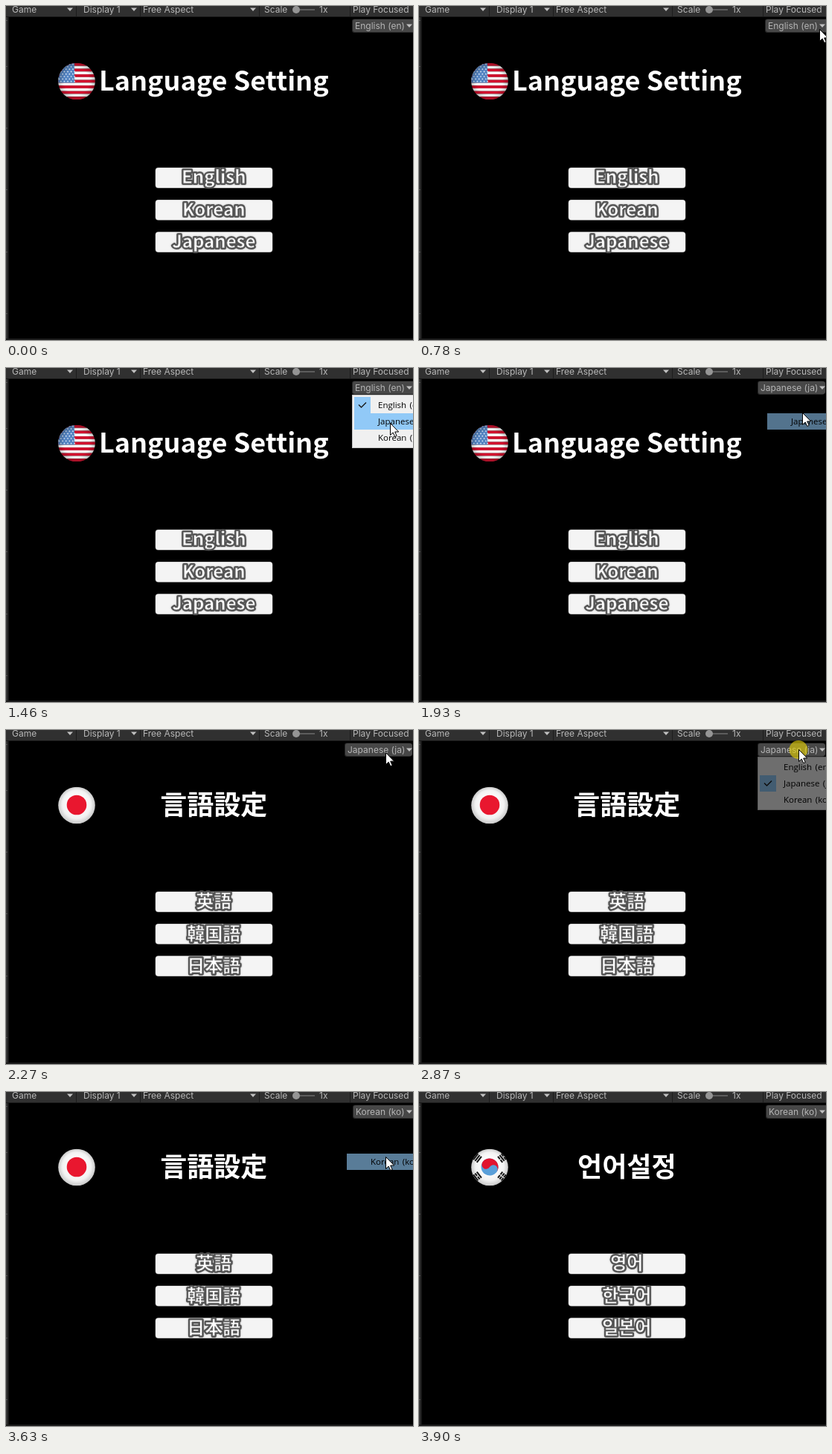
Animation of 547 by 450 pixels, one loop 4.72 s. Source, as an HTML page with a canvas:

```html
<!DOCTYPE html>
<html lang="en">
<head>
<meta charset="utf-8">
<style>
  html, body { margin: 0; width: 100%; height: 100%; overflow: hidden; background: #000; }
  canvas { display: block; }
</style>
</head>
<body>
<canvas id="stage" width="547" height="450"></canvas>
<script>
const c = document.getElementById('stage').getContext('2d');
const LOOP = 4720;
const UI = '12px Inter, Roboto, sans-serif';
const MENU = '11.5px "Open Sans", "Noto Sans", sans-serif';
const BLUE = '#91c9f7';
const FLAG = { x: 95, y: 101.5, r: 24.8 };

const LANGS = {
  en: { label: 'English (en)', x: 465, cjk: 'KR', title: 'Language Setting',
        buttons: ['English', 'Korean', 'Japanese'], flag: flagUS },
  ja: { label: 'Japanese (ja)', x: 455, cjk: 'JP', title: '言語設定',
        buttons: ['英語', '韓国語', '日本語'], flag: flagJapan },
  ko: { label: 'Korean (ko)', x: 466, cjk: 'KR', title: '언어설정',
        buttons: ['영어', '한국어', '일본어'], flag: flagKorea }
};
const ITEMS = ['en', 'ja', 'ko'];

// Each pick: open the menu, then choose a row.
const PICKS = [
  { open: 1050, choose: 1720, from: 'en', to: 'ja' },
  { open: 2870, choose: 3430, from: 'ja', to: 'ko' }
];
// Pointer path: time, x, y
const PATH = [
  [780, 538, 31], [1020, 529, 22], [1185, 529, 22], [1250, 527, 31], [1460, 516, 74],
  [1840, 516, 74], [1930, 515, 60], [2200, 510, 31], [2610, 510, 26], [2950, 510, 26],
  [3160, 510, 87], [3650, 510, 87], [3900, 547, 80]
];

const clamp = v => Math.max(0, Math.min(1, v));

function rect(x, y, w, h, color) {
  c.fillStyle = color;
  c.fillRect(x, y, w, h);
}

function disc(x, y, r, color) {
  c.fillStyle = color;
  c.beginPath();
  c.arc(x, y, r, 0, Math.PI * 2);
  c.fill();
}

function box(x, y, w, h, r, color) {
  c.fillStyle = color;
  c.beginPath();
  c.roundRect(x, y, w, h, r);
  c.fill();
}

function text(s, x, y, font, color, align = 'left') {
  c.font = font;
  c.fillStyle = color;
  c.textAlign = align;
  c.fillText(s, x, y);
}

function arrowDown(x, y) {
  c.fillStyle = '#c0c0c0';
  c.beginPath();
  c.moveTo(x - 4, y);
  c.lineTo(x + 4, y);
  c.lineTo(x, y + 4.5);
  c.fill();
}

function pointerAt(t) {
  const i = PATH.findIndex(p => p[0] > t);
  const [t0, x0, y0] = PATH[i - 1], [t1, x1, y1] = PATH[i];
  const k = (t - t0) / (t1 - t0);
  return [x0 + (x1 - x0) * k, y0 + (y1 - y0) * k];
}

// Flags are drawn around the origin and clipped to a circle.
function flagUS() {
  const stripe = 49 / 13;
  for (let i = 0; i < 13; i++) rect(-25, -24.5 + i * stripe, 50, stripe, i % 2 ? '#fff' : '#d3122f');
  rect(-25, -25, 22, 0.5 + stripe * 7, '#5585c2');
  for (let row = 0; row < 8; row++)
    for (let col = 0; col < 5; col++)
      disc(-23.5 + col * 4.6 + (row % 2) * 2.3, -23 + row * 3.3, 0.85, '#e4eefa');
  const shade = c.createRadialGradient(0, 0, 17, 0, 0, 25);
  shade.addColorStop(0, 'rgba(0,0,0,0)');
  shade.addColorStop(1, 'rgba(0,0,0,.25)');
  rect(-25, -25, 50, 50, shade);
}

function ball() {
  const g = c.createRadialGradient(0, -4, 8, 0, 0, 25);
  g.addColorStop(0, '#fff');
  g.addColorStop(0.65, '#f2f2f2');
  g.addColorStop(1, '#c8c8c8');
  rect(-25, -25, 50, 50, g);
}

function flagJapan() {
  ball();
  disc(0, -0.5, 13.3, '#e9172f');
}

function trigram(x, y, angle, bars) {
  c.save();
  c.translate(x, y);
  c.rotate(angle);
  bars.forEach((solid, i) => {
    rect(-5, i * 3 - 4, 10, 2, '#111');
    if (!solid) rect(-0.7, i * 3 - 4, 1.4, 2, '#eee');
  });
  c.restore();
}

function flagKorea() {
  ball();
  c.save();
  c.translate(0, -0.5);
  c.rotate(0.55);
  disc(0, 0, 11.5, '#5a9fd9');
  c.fillStyle = '#e2132f';
  c.beginPath();
  c.arc(0, 0, 11.5, Math.PI, 0);
  c.fill();
  disc(-5.75, 0, 5.75, '#e2132f');
  disc(5.75, 0, 5.75, '#5a9fd9');
  c.restore();
  trigram(-16.5, -12.5, -0.9, [1, 1, 1]);
  trigram(16.5, -12.5, 0.9, [0, 1, 0]);
  trigram(-16.5, 12, 0.9, [1, 0, 1]);
  trigram(16.5, 12, -0.9, [0, 0, 0]);
}

function drawFlag(flag) {
  c.save();
  c.translate(FLAG.x, FLAG.y);
  c.beginPath();
  c.arc(0, 0, FLAG.r, 0, Math.PI * 2);
  c.clip();
  flag();
  c.restore();
}

function drawEditor() {
  rect(0, 0, 547, 450, '#000');
  rect(0, 14, 4, 436, '#191919');
  rect(0, 14, 2, 436, '#353535');
  for (const y of [19, 81, 164, 247, 331, 414]) rect(0, y, 2, 1, '#5a5a5a');
  rect(0, 448, 547, 2, '#1c1c1c');
  rect(0, 0, 547, 14, '#303030');
  rect(0, 14, 547, 1, '#191919');
  for (const x of [94, 180, 340, 462]) rect(x, 0, 1, 14, '#1c1c1c');
  const labels = [['Game', 8], ['Display 1', 104], ['Free Aspect', 184], ['Scale', 347], ['1x', 421], ['Play Focused', 466]];
  for (const [s, x] of labels) text(s, x, 9, UI, '#b8b8b8');
  for (const x of [86, 172, 332]) arrowDown(x, 2.5);
  rect(390, 4, 25, 2, '#5c5c5c');
  disc(390, 5, 5, '#959595');
}

// White letters whose soft gray outline also eats into the face.
function outlinedText(s, x, y, font) {
  c.font = font;
  c.textAlign = 'center';
  c.lineJoin = 'round';
  c.lineWidth = 4;
  c.strokeStyle = '#505050';
  c.shadowColor = 'rgba(60,60,60,.5)';
  c.shadowBlur = 2;
  c.strokeText(s, x, y);
  c.shadowBlur = 0;
  text(s, x, y, font, '#fff', 'center');
  c.lineWidth = 0.8;
  c.strokeStyle = '#6a6a6a';
  c.strokeText(s, x, y);
}

function drawScene(lang) {
  drawFlag(lang.flag);
  const family = `"Noto Sans CJK ${lang.cjk}", "Noto Sans CJK", "Noto Sans", sans-serif`;
  text(lang.title, 279.3, 114, `bold 36px ${family}`, '#fff', 'center');
  lang.buttons.forEach((s, i) => {
    const y = 218 + i * 43.3;
    box(200.6, y - 0.4, 157.8, 27.8, 4, '#777');
    box(201, y, 157, 27, 4, '#f4f4f4');
    outlinedText(s, 279.3, y + 21.3, `bold 24px ${family}`);
  });
}

function drawDropdown(lang) {
  box(lang.x, 17.5, 90, 18.5, 3, '#262626');
  box(lang.x + 1, 18, 90, 17, 3, '#474747');
  text(lang.label, lang.x + 4, 31, UI, '#b4b4b4');
  arrowDown(542, 24.5);
}

function drawRowText(x, i) {
  c.wordSpacing = '1.5px';
  text(LANGS[ITEMS[i]].label, x + 35, 54 + i * 22, MENU, '#000');
  c.wordSpacing = '0px';
}

function drawMenu(x, checked, hover) {
  rect(x, 36, 100, 72, '#c4c4c4');
  rect(x + 1, 37, 100, 70, '#f0f0f0');
  if (hover >= 0) rect(x + 3, 39 + hover * 22, 100, 22, BLUE);
  const y = 39 + checked * 22;
  rect(x + 3, y, 22, 22, BLUE);
  c.strokeStyle = '#1a1a1a';
  c.lineWidth = 1.4;
  c.beginPath();
  c.moveTo(x + 9, y + 10.5);
  c.lineTo(x + 12.5, y + 14);
  c.lineTo(x + 19, y + 7.5);
  c.stroke();
  ITEMS.forEach((_, i) => drawRowText(x, i));
}

// Fades an area as a whole against the black view.
function veil(x, y, w, h, opacity) {
  rect(x, y, w, h, `rgba(0,0,0,${1 - clamp(opacity)})`);
}

function drawPick(t, pick, pointerY) {
  const x = LANGS[pick.from].x, since = t - pick.choose;
  if (t >= pick.open && since < 70) {
    drawMenu(x, ITEMS.indexOf(pick.from), Math.floor((pointerY - 39) / 22));
    veil(x, 36, 100, 72, 0.45 + (t - pick.open) / 130);
  } else if (since >= 70 && since < 330) {
    // The chosen row lingers after the menu closes.
    const row = ITEMS.indexOf(pick.to), y = 39 + row * 22;
    rect(x + 3, y, 100, 22, BLUE);
    drawRowText(x, row);
    veil(x + 3, y, 100, 22, 1 - (since - 120) / 210);
  }
}

function drawPointer(x, y) {
  c.save();
  c.translate(x, y);
  c.beginPath();
  for (const [px, py] of [[0.5, 0.5], [0.5, 16.5], [4.2, 13], [6.8, 18.6], [9.2, 17.5], [6.7, 12], [11.7, 12]])
    c.lineTo(px, py);
  c.closePath();
  c.fillStyle = '#fff';
  c.fill();
  c.strokeStyle = '#000';
  c.lineWidth = 1;
  c.stroke();
  c.restore();
}

function langAt(t, delay) {
  const done = PICKS.filter(p => t >= p.choose + delay).pop();
  return LANGS[done ? done.to : 'en'];
}

function draw(t) {
  drawEditor();
  drawScene(langAt(t, 280));
  drawDropdown(langAt(t, 140));
  if (t < 780 || t >= 3900) return;
  const [x, y] = pointerAt(t);
  for (const pick of PICKS) {
    drawPick(t, pick, y);
    for (const click of [pick.open, pick.choose])
      if (t >= click && t < click + 110) disc(x, y + 0.5, 12.5, 'rgba(225,205,10,.65)');
  }
  drawPointer(x, y);
}

function tick() {
  draw(performance.now() % LOOP);
  requestAnimationFrame(tick);
}
tick();
</script>
</body>
</html>
```
